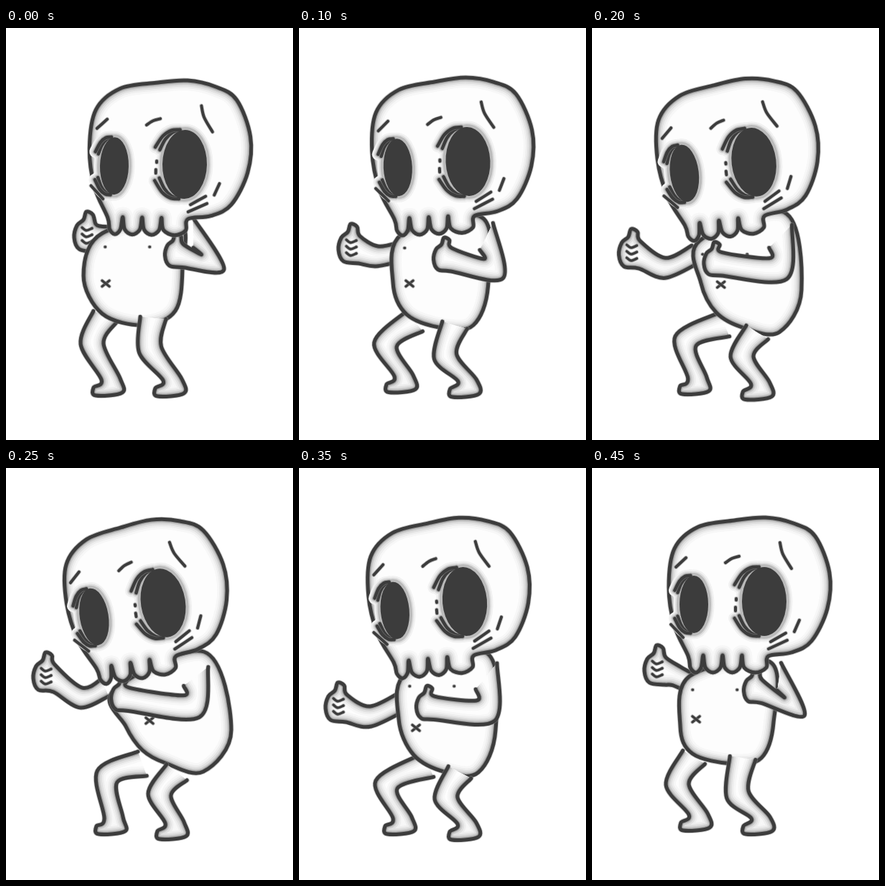
These frames come from a looping animation (400x574 px, 500 ms). An HTML page with a canvas:

```html
<!DOCTYPE html>
<html lang="en">
<head>
<meta charset="utf-8">
<title>Dancing skull</title>
<style>
html, body { margin: 0; width: 100%; height: 100%; overflow: hidden; background: #fff; }
canvas { display: block; }
</style>
</head>
<body>
<canvas width="400" height="574"></canvas>
<script>
const ctx = document.querySelector('canvas').getContext('2d');
const INK = '#3c3c3c', SKIN = '#fdfdfd';
const STEP = 50;

// Key poses of the rig. Limbs run from the root joint to the ankle or fist;
// the torso goes from the throat down the belly and up the back.
const KEYS = [{
  eye: [249, 190], tilt: 1, navel: [139, 356],
  torso: [[134, 286], [108, 345], [134, 398], [192, 414], [236, 394], [246, 335], [240, 270]],
  farLeg: [[138, 402], [120, 440], [146, 489]], nearLeg: [[205, 404], [201, 448], [232, 490]],
  farArm: [[142, 290], [130, 290], [112, 287]], nearArm: [[248, 274], [288, 326], [236, 313]]
}, {
  eye: [240, 186], tilt: 0, navel: [145, 350],
  torso: [[136, 290], [123, 360], [140, 398], [195, 412], [236, 404], [253, 355], [248, 270]],
  farLeg: [[142, 403], [119, 441], [148, 482]], nearLeg: [[210, 404], [203, 455], [235, 487]],
  farArm: [[138, 300], [118, 290], [90, 278]], nearArm: [[250, 280], [282, 332], [226, 307]]
}, {
  eye: [231, 186], tilt: -5, navel: [163, 362],
  torso: [[150, 285], [139, 350], [160, 400], [205, 424], [250, 424], [274, 365], [262, 258]],
  farLeg: [[180, 414], [122, 441], [144, 487]], nearLeg: [[224, 424], [205, 460], [234, 495]],
  farArm: [[150, 322], [100, 346], [54, 330]], nearArm: [[260, 272], [260, 338], [178, 330]]
}, {
  eye: [219, 188], tilt: -9, navel: [200, 352],
  torso: [[150, 310], [167, 360], [190, 393], [222, 411], [275, 423], [314, 365], [276, 256]],
  farLeg: [[190, 412], [141, 430], [150, 487]], nearLeg: [[238, 424], [214, 455], [235, 494]],
  farArm: [[138, 306], [105, 320], [55, 288]], nearArm: [[266, 275], [258, 332], [161, 318]]
}];
// Position between the key poses, one entry per step: a crouch and back up.
const DOWN = [0, 1, 1.5, 2, 2.45];
const TIMELINE = [...DOWN, 3, ...DOWN.slice(1).reverse()];

// Templates, relative to the near eye, the ankle and the middle of the fist.
const TEETH = [-106, -85, -58, -31, 6];
const JAW = [[-133, -20], [-125, 34], [-106, 76]];
const CROWN = [[6, 76], [38, 71], [66, 55], [88, 10], [91, -40], [71, -91], [41, -109], [2, -117], [-42, -113], [-92, -104], [-125, -74]];
const WRINKLES = [
  [[-123, -48], [-109, -61]], [[-54, -54], [-45, -60], [-35, -63]], [[22, -82], [26, -66], [38, -46]],
  [[42, 42], [49, 26]], [[9, 56], [30, 44]], [[6, 66], [32, 54]], [[-130, 32], [-113, 50]],
  [[-39, -4], [-39, -2]], [[-40, 8], [-40, 13]]
];
const FOOT = [[-13, 1], [-24, 12], [-21, 23], [16, 19], [13, -1]];
const FIST = [[11, 24], [-10, 21], [-17, 5], [-13, -12], [-4, -20], [0, -31], [9, -27], [13, -14]];

function mix(a, b, t) {
  if (Array.isArray(a)) return a.map((v, i) => mix(v, b[i], t));
  if (typeof a === 'object') return Object.fromEntries(Object.keys(a).map(k => [k, mix(a[k], b[k], t)]));
  return a + (b - a) * t;
}

const shift = (points, [x, y], scale = 1) => points.map(([u, v]) => [x + u * scale, y + v * scale]);

// Smooth curve through the points.
function curve(points, closed) {
  const n = points.length;
  const at = i => points[closed ? (i + n) % n : Math.max(0, Math.min(n - 1, i))];
  const path = new Path2D();
  path.moveTo(...points[0]);
  for (let i = 0; i < (closed ? n : n - 1); i++) {
    const [a, b, c, d] = [at(i - 1), at(i), at(i + 1), at(i + 2)];
    path.bezierCurveTo(b[0] + (c[0] - a[0]) / 6, b[1] + (c[1] - a[1]) / 6,
      c[0] - (d[0] - b[0]) / 6, c[1] - (d[1] - b[1]) / 6, c[0], c[1]);
  }
  if (closed) path.closePath();
  return path;
}

function stroke(path, width, color) {
  ctx.lineWidth = width;
  ctx.strokeStyle = color;
  ctx.stroke(path);
}

function line(path, width = 5) {
  stroke(path, width + 1.8, '#8a8a8a80');
  stroke(path, width, INK);
}

// White shape with a soft shade along the inside of its outline.
function shape(path) {
  ctx.fillStyle = SKIN;
  ctx.fill(path);
  ctx.save();
  ctx.clip(path);
  for (const [width, color] of [[28, '#f7f7f7'], [22, '#eeeeee'], [17, '#e0e0e0'], [12, '#cbcbcb'], [8, '#aaaaaa']]) {
    stroke(path, width, color);
  }
  ctx.restore();
  line(path);
}

// Offsets the root and the middle joint sideways by their radii.
function side(joints, radii, sign) {
  const unit = (a, b) => {
    const d = Math.hypot(b[0] - a[0], b[1] - a[1]);
    return [(b[0] - a[0]) / d, (b[1] - a[1]) / d];
  };
  const [root, joint, end] = joints;
  const d1 = unit(root, joint), d2 = unit(joint, end);
  const bend = unit([0, 0], [d1[0] + d2[0], d1[1] + d2[1]]);
  return [[root, d1], [joint, bend]].map(([p, d], i) =>
    [p[0] + sign * d[1] * radii[i], p[1] - sign * d[0] * radii[i]]);
}

function limb(joints, radii, sign, tip, rootOverlap = 1) {
  const outer = side(joints, radii, sign);
  const [innerRoot, innerJoint] = side(joints, radii, -sign);
  shape(curve([...outer, ...tip, innerJoint, mix(innerJoint, innerRoot, rootOverlap)]));
}

const leg = joints => limb(joints, [18, 16], -1, shift(FOOT, joints[2]));

function farArm(joints) {
  limb(joints, [13, 14], 1, shift(FIST, joints[2]));
  for (const y of [-9, 0, 9]) line(curve(shift([[-6, y], [0, y + 4], [8, y + 1]], joints[2])), 3.5);
}

const nearArm = joints => limb(joints, [16, 19], 1, shift(FIST, joints[2], .85), .3);

function torso({ torso, navel }) {
  shape(curve(torso, true));
  for (const x of [4, 66]) line(curve(shift([[x, 19], [x + .5, 19]], torso[0])), 3.5);
  for (const slope of [-1, 1]) line(curve(shift([[-5, -4 * slope], [5, 4 * slope]], navel)), 3.5);
}

function head({ eye, tilt }) {
  ctx.save();
  ctx.translate(...eye);
  ctx.rotate(tilt * Math.PI / 180);
  const teeth = TEETH.slice(1).flatMap((right, i) => {
    const left = TEETH[i];
    return [[left + 3, 92], [(left + right) / 2, 99], [right - 3, 92], [right, 75]];
  });
  shape(curve([...JAW, ...teeth.slice(0, -1), ...CROWN], true));
  socket(0, 0, 31, 48);
  socket(-98, 4, 20, 40);
  WRINKLES.forEach(w => line(curve(w), 4));
  ctx.restore();
}

// Dark pupil with brush arcs that sweep in towards it from the left.
function socket(x, y, rx, ry) {
  const point = (angle, r) => [x + Math.cos(angle) * rx * r, y + Math.sin(angle) * ry * r];
  const arcs = [-1, 1].flatMap(way => [1.2, 1.42].map(reach => curve([0, 1, 2, 3].map(i =>
    point(Math.PI + way * (.35 + i * .33), mix(reach, 1.03, i / 3))))));
  const pupil = new Path2D();
  pupil.ellipse(x, y, rx, ry, 0, 0, 2 * Math.PI);
  for (const [width, color] of [[17, '#f1f1f1'], [12, '#dddddd'], [8, '#bbbbbb']]) {
    [pupil, ...arcs].forEach(p => stroke(p, width, color));
  }
  arcs.forEach(p => line(p, 4.5));
  ctx.fillStyle = INK;
  ctx.fill(pupil);
}

function draw(position) {
  const key = Math.min(Math.floor(position), KEYS.length - 2);
  const pose = mix(KEYS[key], KEYS[key + 1], position - key);
  ctx.clearRect(0, 0, 400, 574);
  ctx.lineCap = ctx.lineJoin = 'round';
  leg(pose.farLeg);
  farArm(pose.farArm);
  torso(pose);
  leg(pose.nearLeg);
  nearArm(pose.nearArm);
  head(pose);
}

const start = performance.now();
function tick() {
  draw(TIMELINE[Math.floor((performance.now() - start) / STEP) % TIMELINE.length]);
  requestAnimationFrame(tick);
}
tick();
</script>
</body>
</html>
```
